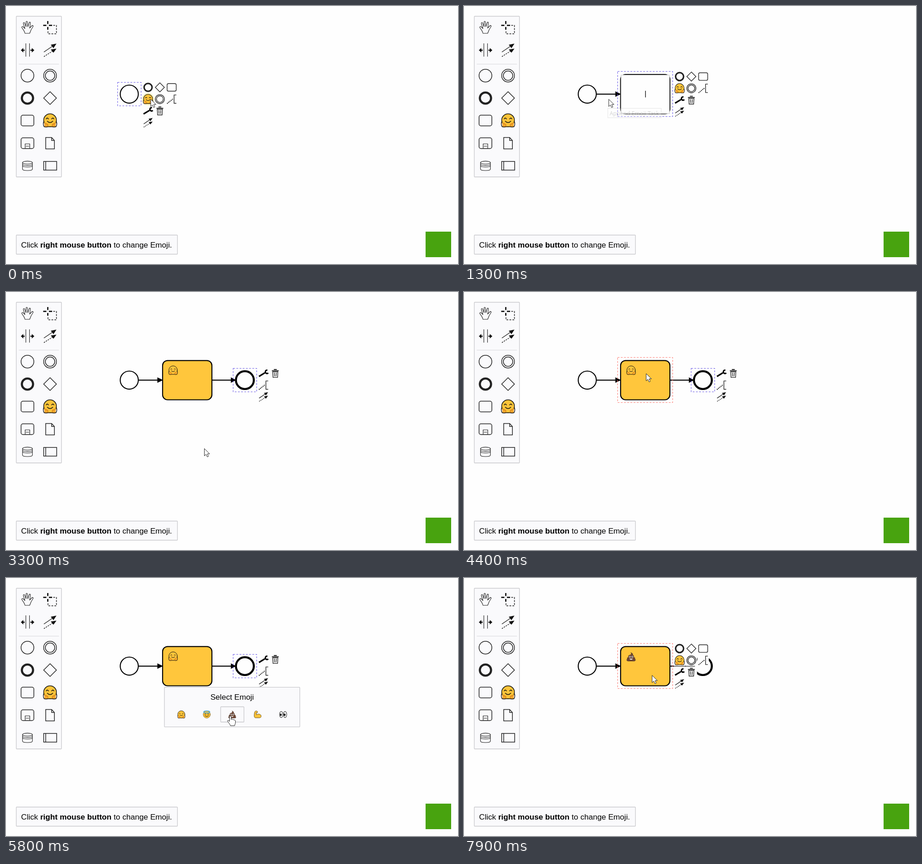
An HTML page that plays this animation: 990 px wide and 566 px high, repeating every 8000 ms.

```html
<!DOCTYPE html>
<html lang="en">
<head>
<meta charset="utf-8">
<title>Emoji task modeler</title>
<style>
  html, body { margin: 0; width: 100%; height: 100%; overflow: hidden; background: #fefefe; }
  svg { display: block; width: 100%; height: 100%; }
  text { font: 17.15px "Liberation Sans", Arial, sans-serif; }
  .icon { fill: none; stroke: #222; stroke-width: var(--line, 1.5); }
  .fine { stroke-width: 1.15; }
  .pad { --line: 1.95; }
  .solid { fill: #111; stroke: none; }
  .panel { fill: #fafafc; stroke: #c8c8cc; stroke-width: 1.3; }
  .shape { fill: #fefefe; stroke: #000; stroke-width: 2.2; }
  .outline { fill: none; stroke: #6a5be6; stroke-width: 1.1; stroke-dasharray: 4 3; }
  .hover { stroke: #ff7a72; }
</style>
</head>
<body>
<svg viewBox="0 0 990 566">
  <defs>
    <radialGradient id="glowFill">
      <stop offset=".65" stop-color="#fff09a"/><stop offset="1" stop-color="#fff09a" stop-opacity="0"/>
    </radialGradient>
    <circle id="glow" r="15" fill="url(#glowFill)"/>

    <!-- tools -->
    <path id="hand" class="icon fine" stroke-linejoin="round" d="M-5.500 13C-6.500 8-9.500 4.500-12 1C-13.500-1.500-10.500-3-9-1L-5.500 2.500L-9-8.500C-9.500-11-6.800-11.500-6-9.500L-3-1.500V-12C-3-14-.3-14-.2-12L.8-1.500L3.800-10.500C4.800-12.500 7-11.500 6.500-9.500L4.800 1.500L9.500-3.500C11.500-5.500 13.500-3.500 12-1.500C8 4 6.500 8 4.800 13Z"/>
    <g id="lasso" class="icon">
      <path stroke-width="3" d="M-15-4.500h7M-2.500-4.500h7M-5-14v6.500M-5-1v6"/>
      <path stroke-dasharray="4 2.500" d="M7-4.500H14V14H-4.500V6"/>
    </g>
    <g id="space" class="icon fine">
      <path d="M-3.500-15V14M4.500-15V14"/>
      <path class="solid" d="M-14.500 0l5.500-5v3.700h3v2.600h-3v3.700zM15 0l-5.500-5v3.700h-3v2.600h3v3.700z"/>
    </g>
    <g id="link" class="icon">
      <path d="M-13.500 4L7-10"/><path stroke-dasharray="3 2" d="M-13.500 14L7 1"/>
      <path class="solid" d="M14-14.500L7.500-4.500L1.500-12ZM14-3.500L7.500 5.500L1.500-1.500Z"/>
    </g>

    <!-- elements -->
    <circle id="start" class="icon" r="14"/>
    <g id="mid" class="icon"><circle r="14"/><circle r="10.300"/></g>
    <circle id="end" class="icon" r="12.300" style="stroke-width:4.600"/>
    <path id="gate" class="icon" d="M0-14L14 0L0 14L-14 0Z"/>
    <rect id="task" class="icon" x="-14" y="-11.700" width="28" height="23.400" rx="4"/>
    <g id="sub" class="icon"><use href="#task"/><path stroke-width="1.200" d="M-5 11V1.500H5V11M-3.500 6.500h7"/></g>
    <path id="data" class="icon" d="M-9.500-12.500H3.500L9.500-6V12.500H-9.500ZM3.500-12.500V-6H9.500"/>
    <g id="store" class="icon fine">
      <ellipse cy="-7" rx="10.800" ry="3.200"/>
      <path d="M-10.800-7V7.500C-10.800 11.500 10.800 11.500 10.800 7.500V-7M-10.800-3.800C-10.800.5 10.800.5 10.800-3.800M-10.800-.5C-10.800 3.800 10.800 3.800 10.800-.5"/>
    </g>
    <path id="pool" class="icon" d="M-14-9.500H14.500V9.500H-14ZM-9.500-9.500V9.500"/>

    <!-- context pad extras -->
    <g id="note" class="icon">
      <path stroke-width="3.300" stroke-linecap="round" stroke-dasharray="0 5" d="M-13 13L3 0"/>
      <path d="M14.500-13H7.500V13H14.500"/>
    </g>
    <g id="wrench" class="icon" style="stroke:#000">
      <path stroke-width="4.600" d="M-14 9.500L4-1.500"/><path stroke-width="4.300" d="M12-9.500A5 5 0 1 0 14.500-1.500"/>
    </g>
    <g id="bin" class="icon">
      <path stroke-width="2.800" d="M-10.500-8h21M-4.500-12h9"/>
      <path d="M-8-5L-7 12.500H7L8-5Z"/><path d="M-3-2.500l.8 11.500M3-2.500l-.8 11.500"/>
    </g>

    <!-- emoji, 30 units across -->
    <g id="hug" stroke="#111" stroke-width="1.500" stroke-linecap="round" stroke-linejoin="round">
      <circle r="14" cy="-.8" fill="#fcc43a"/>
      <path fill="#f5a52a" stroke="none" d="M-13 4L-4 7H4L13 4L12 14H-12Z"/>
      <path fill="#fcc43a" stroke="none" d="M-4 7H4V14H-4Z"/>
      <path fill="none" d="M-13.500 2C-15.500 5-15 10-13 13.500Q-9 15-4 13.500H4Q9 15 13 13.500C15 10 15.500 5 13.500 2"/>
      <path fill="none" stroke="#b56d12" stroke-width=".9" d="M-11 5L-5 9.500L-4 13M11 5L5 9.500L4 13"/>
      <path fill="none" d="M-8.500-3.500Q-6-7.500-3.500-3.500M3.500-3.500Q6-7.500 8.500-3.500M-6 1.500Q0 7.500 6 1.500"/>
    </g>
    <g id="halo" stroke="#5b4310" stroke-linecap="round" fill="none">
      <circle r="14" fill="#fcc43a" stroke-width="1.200"/>
      <path stroke-width="2" d="M-8-1Q-5.500-4-3-1M3-1Q5.500-4 8-1M-7 4Q0 11 7 4"/>
      <ellipse cy="-10" rx="12" ry="4" stroke="#4ba9d8" stroke-width="3"/>
    </g>
    <g id="pile">
      <path fill="#6d4534" stroke="#3b241b" d="M-1-14C5-12 7-9 5-6C9-5 10-2 8 1C13 2 14 5 12 7C16 9 15 14 10 14H-10C-15 14-16 9-12 7C-14 5-13 2-8 1C-10-2-9-5-4-6C1-8 2-10-1-14Z"/>
      <g fill="#fff"><circle cx="-4" r="3"/><circle cx="4" r="3"/><path d="M-6 6H6Q0 13-6 6Z"/></g>
      <circle cx="-4" r="1.500"/><circle cx="4" r="1.500"/>
    </g>
    <path id="arm" fill="#fcc43a" stroke="#4a370e" stroke-width="1.500" stroke-linejoin="round" d="M-12-9C-10-15-4-15-1-12C1-9-1-6-4-6L-6-7L-5 1C1-3 9-3 13 3C15 9 12 13 6 13H-9C-14 12-15 5-12-9Z"/>
    <g id="eyes">
      <g fill="#fff" stroke="#222" stroke-width="1.800"><ellipse cx="-7.500" rx="6.500" ry="12"/><ellipse cx="7.500" rx="6.500" ry="12"/></g>
      <ellipse cx="-9" cy="1" rx="3.300" ry="5"/><ellipse cx="6" cy="1" rx="3.300" ry="5"/>
    </g>
  </defs>

  <rect class="panel" x="22.500" y="22.500" width="99" height="352.500" rx="1"/>
  <path stroke="#d8d8dc" d="M28 127.500H116"/>
  <g id="palette"></g>
  <rect class="panel" x="22.500" y="502.500" width="353" height="42" rx="1"/>
  <text x="33" y="529.500">Click <tspan font-weight="bold">right mouse button</tspan> to change Emoji.</text>
  <rect x="919" y="495" width="56" height="56" fill="#48a30f"/>

  <circle class="shape" cx="270" cy="193.300" r="19.800"/>
  <g id="taskNode">
    <rect id="body" class="shape" x="343" y="150.300" width="108" height="86.200" rx="11"/>
    <path class="shape" d="M290 193.300H335"/><path d="M331.500 187.300L344 193.300L331.500 199.300Z"/>
    <g id="editor">
      <rect x="344" y="151.500" width="106" height="84.500" fill="#fefefe" stroke="#c4c4c4"/>
      <path stroke="#000" stroke-width="1.300" d="M397.500 186V200.500"/>
    </g>
    <use id="mark"/>
  </g>
  <g id="endNode">
    <path class="shape" d="M452 193.300H495"/><path d="M492.500 187.300L504 193.300L492.500 199.300Z"/>
    <circle class="shape" cx="523.200" cy="193.300" r="19.600" style="stroke-width:4.400"/>
  </g>
  <rect id="select" class="outline"/>
  <rect id="over" class="outline hover" x="336.500" y="143.500" width="120.500" height="99"/>
  <g id="startPad" class="pad"></g><g id="taskPad" class="pad"></g><g id="endPad" class="pad"></g>

  <g id="menu">
    <rect class="panel" x="347" y="239.700" width="296.500" height="87" rx="1"/>
    <text x="495.300" y="267" text-anchor="middle">Select Emoji</text>
    <rect id="button" class="panel" y="282.500" width="51" height="33.500" rx="1"/>
    <g id="choices"></g>
  </g>
  <g id="tip">
    <rect x="315" y="224.500" width="117" height="20.500" fill="#fff" stroke="#999"/>
    <text x="319" y="240" fill="#575757" style="font:12.300px 'Open Sans',sans-serif">Append Emoji Task</text>
  </g>
  <g id="cursor" stroke="#222" fill="#fff" stroke-linejoin="round">
    <path id="arrow" d="M0 0V16L3.700 12.600L6.300 18.300L9 17L6.500 11.600H11.500Z"/>
    <path id="finger" d="M-2 1.500A1.800 1.800 0 0 1 1.600 1.500V7.500C1.600 6 5 6.200 5 8C5 7 8 7 8 8.800C8.500 8 11 8.300 11 10.500V14.500C11 17 9.500 18 9.300 21H0C-.5 18-4 14.500-6 11.500C-7.300 9.300-4.500 8.300-2 11.500Z"/>
  </g>
</svg>
<script>
const $ = id => document.getElementById(id);
const use = (id, x, y, s = 1) => `<use href="#${id}" transform="translate(${x} ${y}) scale(${s})"/>`;
const show = (id, on) => $(id).style.display = on ? '' : 'none';
const place = (node, attrs) => { for (const k in attrs) node.setAttribute(k, attrs[k]); };

const rows = [47, 97, 152.7, 202, 251.3, 301, 350.5];
$('palette').innerHTML = 'hand lasso space link start mid end gate task hug sub data store pool'.split(' ')
  .map((id, i) => use(id, i % 2 ? 96.5 : 47, rows[i >> 1])).join('');

// Icons stand on opaque tiles; the hovered one glows above the tiles.
const step = 25.8;
function fillPad(pad, x0, y0, lines, glowing) {
  let tiles = '', glow = '', icons = '';
  lines.forEach((line, r) => line.split(' ').forEach((id, c) => {
    const x = x0 + c * step, y = y0 + r * step;
    tiles += `<rect x="${x - 12.4}" y="${y - 12.4}" width="24.8" height="24.8" fill="#fefefe"/>`;
    if (id === glowing) glow = `<g id="${pad}Glow">${use('glow', x, y)}</g>`;
    icons += use(id, x, y, 0.71);
  }));
  $(pad).innerHTML = tiles + glow + icons;
}
const full = ['end gate task', 'hug mid note', 'wrench bin', 'link'];
fillPad('startPad', 311.2, 178.5, full, 'hug');
fillPad('taskPad', 472.2, 154.8, full, 'end');
fillPad('endPad', 564, 178.5, ['wrench bin', 'note', 'link']);

const buttonX = i => 384 + i * 55.75;
$('choices').innerHTML = ['hug', 'halo', 'pile', 'arm', 'eyes']
  .map((id, i) => use(id, buttonX(i), 299.5, 0.56)).join('');

// Cursor moves: start time, end time, target
const moves = [
  [1700, 2400, 466, 155], [2700, 3300, 434.5, 343.5], [3500, 4400, 399, 179],
  [5200, 5800, 491.5, 303], [7000, 7600, 412, 213.5]
];
function cursorAt(t) {
  let x = 317, y = 204.5;
  for (const [from, to, tx, ty] of moves) {
    const k = Math.min(1, Math.max(0, (t - from) / (to - from)));
    const e = k * k * (3 - 2 * k);
    x += (tx - x) * e;
    y += (ty - y) * e;
  }
  return [x, y];
}

function draw(now) {
  const t = Math.floor(now % 8000 / 100) * 100;
  const [x, y] = cursorAt(t);
  const editing = t >= 1100 && t < 2700, done = t >= 2700, picked = t >= 6500, reselected = t >= 7900;
  const menu = t >= 4900 && !picked;
  const onTask = done && x > 342 && x < 452 && y > 149 && y < 238;

  show('taskNode', t >= 1100);
  show('editor', editing);
  show('endNode', done);
  $('body').style.fill = done ? '#ffc63c' : '';
  place($('mark'), { href: picked ? '#pile' : '#hug', transform: `translate(366 ${picked ? 173 : 171.8}) scale(.66)` });
  show('mark', done);

  show('startPad', t < 1100);
  show('taskPad', editing || reselected);
  show('taskPadGlow', editing && t >= 2300);
  show('endPad', done && !reselected);
  show('select', !reselected);
  place($('select'), editing
    ? { x: 336.5, y: 143.5, width: 120.5, height: 99 }
    : { x: done ? 497.5 : 244.5, y: 167.5, width: 51.5, height: 51.5 });
  show('over', onTask);

  const i = Math.round((x - 384) / 55.75);
  const onButton = menu && y > 282 && y < 316 && Math.abs(x - buttonX(i)) < 25.5;
  show('menu', menu);
  show('button', onButton);
  place($('button'), { x: buttonX(i) - 25.3 });

  const fade = t < 1100 ? (t - 400) / 500 : 1 - (t - 1000) / 400;
  $('tip').style.opacity = Math.min(1, Math.max(0, fade));

  show('arrow', !onButton);
  show('finger', onButton);
  place($('cursor'), { transform: `translate(${x} ${y})` });
}

let begin;
function frame(now) {
  begin ??= now;
  draw(now - begin);
  requestAnimationFrame(frame);
}
draw(0);
requestAnimationFrame(frame);
</script>
</body>
</html>
```
